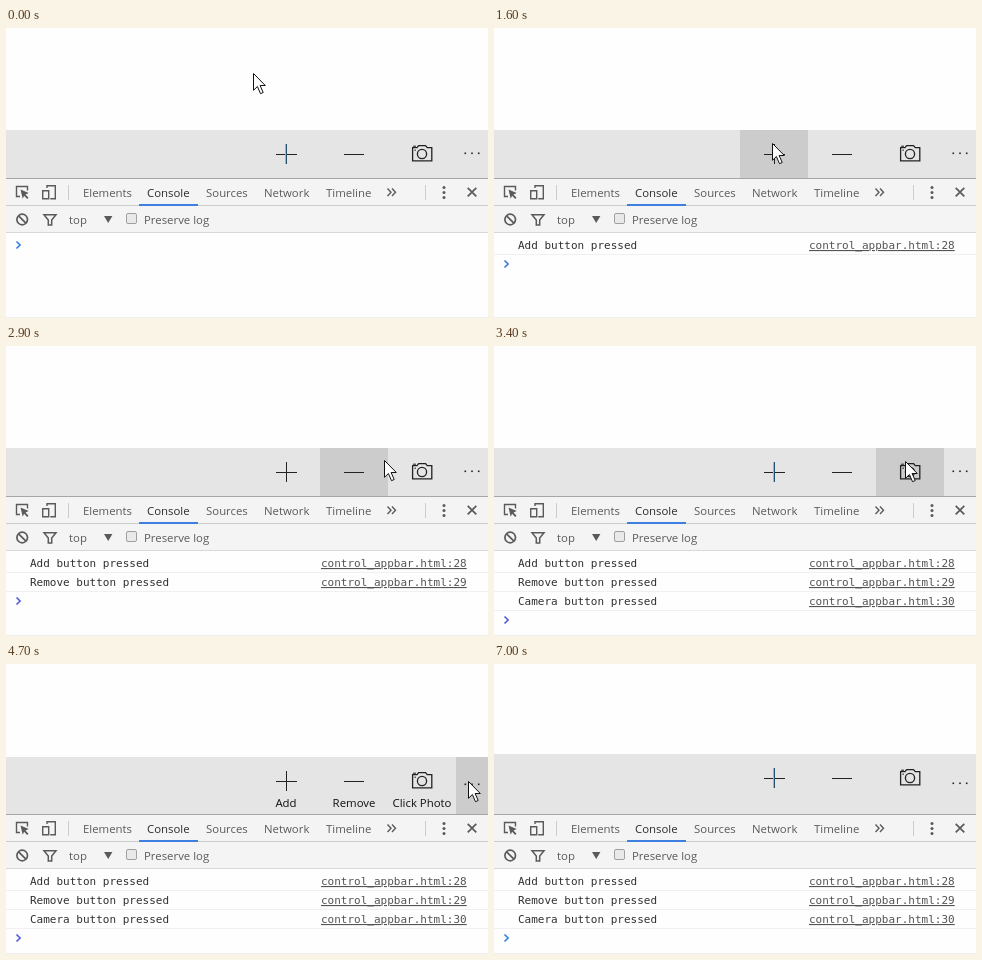
Recreate the animation shown at these times as an HTML page. Size 482 px wide and 290 px high, loop 7100 ms.

```html
<!DOCTYPE html>
<html lang="en">
<head>
<meta charset="utf-8">
<title>App bar and console</title>
<style>
html, body { margin: 0; width: 100%; height: 100%; overflow: hidden; background: #fefefe; }
svg { display: block; width: 482px; height: 290px; }
text { font: 11.4px "Open Sans", "Noto Sans", sans-serif; fill: #5a5a5a; white-space: pre; }
.mono text { font: 11px "DejaVu Sans Mono", "Liberation Mono", monospace; fill: #303030; }
.mono .link { fill: #545454; text-decoration: underline; }
.label { fill: #111; text-anchor: middle; }
.line { fill: none; stroke: #5a5a5a; stroke-width: 1.4; }
.solid { fill: #5a5a5a; }
.crisp { shape-rendering: crispEdges; }

.anim { animation: 7.1s step-end infinite; }
#cursor { animation-name: cursor; }
#hot { animation-name: hot; }
#bar { animation-name: bar; }
#dots { animation-name: dots; }
#labels { animation-name: labels; }
#tint { animation-name: tint; }
#prompt { animation-name: prompt; }
#log1 { animation-name: log1; }
#log2 { animation-name: log2; }
#log3 { animation-name: log3; }

@keyframes cursor {
  0% { transform: translate(247px, 45px); }
  11.26% { transform: translate(250px, 52px); }
  12.67% { transform: translate(258px, 70px); }
  14.08% { transform: translate(268px, 93px); }
  15.49% { transform: translate(276px, 110px); }
  16.9% { transform: translate(278px, 115px); }
  25.35% { transform: translate(290px, 115px); }
  26.76% { transform: translate(324px, 114px); }
  28.16% { transform: translate(343px, 113px); }
  38.02% { transform: translate(347px, 113px); }
  39.43% { transform: translate(361px, 114px); }
  40.84% { transform: translate(378px, 114px); }
  42.25% { transform: translate(400px, 115px); }
  43.66% { transform: translate(411px, 115px); }
  56.33% { transform: translate(428px, 115px); }
  57.74% { transform: translate(454px, 115px); }
  59.15% { transform: translate(460px, 116px); }
  60.56% { transform: translate(462px, 117px); }
  76.05% { transform: translate(472px, 117px); opacity: 1; }
  77.46%, 100% { transform: translate(490px, 117px); opacity: 0; }
}
@keyframes hot {
  0% { transform: translateX(246px); opacity: 0; }
  14.08% { transform: translateX(246px); opacity: .11; }
  19.71% { transform: translateX(246px); opacity: .2; }
  21.12% { transform: translateX(246px); opacity: .11; }
  26.76% { transform: translateX(314px); opacity: .11; }
  32.39% { transform: translateX(314px); opacity: .2; }
  33.8% { transform: translateX(314px); opacity: .11; }
  42.25% { transform: translateX(382px); opacity: .11; }
  46.47% { transform: translateX(382px); opacity: .2; }
  47.88% { transform: translateX(382px); opacity: .11; }
  57.74% { transform: translateX(450px); opacity: .11; }
  63.38% { transform: translateX(450px); opacity: .2; }
  64.78% { transform: translateX(450px); opacity: .11; }
  77.46%, 100% { transform: translateX(450px); opacity: 0; }
}
@keyframes bar {
  0% { transform: translateY(0); }
  64.78% { transform: translateY(-5px); }
  66.19% { transform: translateY(-9px); }
  67.6% { transform: translateY(-11px); }
  69.01%, 100% { transform: translateY(-12px); }
}
@keyframes dots {
  0% { transform: translateY(0); }
  64.78% { transform: translateY(-3px); }
  66.19% { transform: translateY(-5px); }
  67.6%, 100% { transform: translateY(-6px); }
}
@keyframes labels {
  0% { opacity: 0; }
  64.78% { opacity: 1; }
  98.59%, 100% { opacity: 0; }
}
@keyframes tint {
  0% { opacity: 1; }
  1.4% { opacity: 0; }
  46.47% { opacity: 1; }
  63.38% { opacity: 0; }
  84.5%, 100% { opacity: 1; }
}
@keyframes prompt {
  0% { transform: translateY(0); stroke: #2f7fe0; }
  21.12% { transform: translateY(19px); stroke: #3f74e0; }
  33.8% { transform: translateY(38px); stroke: #5058dc; }
  47.88% { transform: translateY(57px); stroke: #5058dc; }
  84.5%, 100% { transform: translateY(57px); stroke: #2f7fe0; }
}
@keyframes log1 { 0% { opacity: 0; } 21.12%, 100% { opacity: 1; } }
@keyframes log2 { 0% { opacity: 0; } 33.8%, 100% { opacity: 1; } }
@keyframes log3 { 0% { opacity: 0; } 47.88%, 100% { opacity: 1; } }
</style>
</head>
<body>
<svg viewBox="0 0 482 290">
  <rect width="482" height="290" fill="#fefefe"/>

  <!-- app bar -->
  <g id="bar" class="anim">
    <rect class="crisp" y="102" width="482" height="60" fill="#e5e5e5"/>
    <rect id="hot" class="anim crisp" y="102" width="68" height="60" opacity="0"/>
    <g class="crisp" fill="#222">
      <rect x="270" y="126" width="21" height="1"/>
      <rect x="280" y="116" width="1" height="20"/>
      <rect x="338" y="126" width="20" height="1"/>
    </g>
    <g id="tint" class="anim crisp">
      <rect x="279" y="116" width="1" height="20" fill="#dca860"/>
      <rect x="280" y="116" width="1" height="20" fill="#24506e"/>
    </g>
    <g fill="none" stroke="#222" stroke-width="1.3">
      <path d="M406.6 119.6h4.4l1.6-2h7l1.6 2h4.6v13.2h-19.2z"/>
      <circle cx="416" cy="126" r="4.6"/>
      <path d="M407 118.2h3M408.4 122.2h1.6" stroke-width="1"/>
    </g>
    <g id="labels" class="anim">
      <text class="label" x="280" y="152">Add</text>
      <text class="label" x="348" y="152">Remove</text>
      <text class="label" x="416" y="152">Click Photo</text>
    </g>
  </g>
  <g id="dots" class="anim" fill="#222">
    <rect x="458.5" y="124.5" width="1.6" height="1.6"/>
    <rect x="465.2" y="124.5" width="1.6" height="1.6"/>
    <rect x="471.9" y="124.5" width="1.6" height="1.6"/>
  </g>

  <!-- developer tools -->
  <g class="crisp">
    <rect y="150" width="482" height="140" fill="#fefefe"/>
    <rect y="150" width="482" height="55" fill="#f4f4f4"/>
    <rect y="150" width="482" height="1" fill="#a6a6a6"/>
    <rect y="177" width="482" height="1" fill="#cdcdcd"/>
    <rect y="204" width="482" height="1" fill="#d8d8d8"/>
    <rect y="289" width="482" height="1" fill="#efefef"/>
    <rect x="133" y="176" width="59" height="2" fill="#3f7fdd"/>
    <rect x="62" y="157" width="1" height="15" fill="#ccc"/>
    <rect x="419" y="157" width="1" height="15" fill="#ccc"/>
  </g>

  <g class="line">
    <path d="M14 168.5h-3.5v-10h11v4"/>
    <path d="M41 160v-2.3h8.3v13h-5M36.7 162.7h6v8h-6z"/>
    <path d="M381.5 160.5l3.5 3.7-3.5 3.7M386 160.5l3.5 3.7-3.5 3.7"/>
    <path d="M461.7 159.8l8.6 8.6M470.3 159.8l-8.6 8.6" stroke-width="1.7"/>
    <circle cx="16.2" cy="191.5" r="5.3" stroke-width="1.7"/>
    <path d="M12.6 187.8l7.3 7.3" stroke-width="1.7"/>
    <path d="M38 186.7h12l-4.3 5.3v5h-3.4v-5z" stroke-width="1.5"/>
  </g>
  <g class="solid">
    <path d="M14.5 161.5l8.2 3.6-3.2 1.3 3 3.3-1.3 1.3-3.1-3.2-1.4 2.9z"/>
    <circle cx="438" cy="159.5" r="1.5"/>
    <circle cx="438" cy="164.5" r="1.5"/>
    <circle cx="438" cy="169.5" r="1.5"/>
    <path d="M98 188h8.4l-4.2 7z"/>
  </g>
  <rect x="120.5" y="185.5" width="10" height="10" rx="1.5" fill="#e9e9e9" stroke="#a0a0a0"/>

  <text x="77" y="169">Elements</text>
  <text x="141" y="169" style="fill:#2c2c2c">Console</text>
  <text x="200" y="169">Sources</text>
  <text x="258" y="169">Network</text>
  <text x="320" y="169">Timeline</text>
  <text x="63" y="196">top</text>
  <text x="138" y="196">Preserve log</text>

  <!-- console output -->
  <g class="mono">
    <g id="log1" class="anim">
      <text x="24" y="221">Add button pressed</text>
      <text class="link" x="315" y="221">control_appbar.html:28</text>
      <rect class="crisp" y="226" width="482" height="1" fill="#f0f0f0"/>
    </g>
    <g id="log2" class="anim">
      <text x="24" y="240">Remove button pressed</text>
      <text class="link" x="315" y="240">control_appbar.html:29</text>
      <rect class="crisp" y="245" width="482" height="1" fill="#f0f0f0"/>
    </g>
    <g id="log3" class="anim">
      <text x="24" y="259">Camera button pressed</text>
      <text class="link" x="315" y="259">control_appbar.html:30</text>
      <rect class="crisp" y="264" width="482" height="1" fill="#f0f0f0"/>
    </g>
  </g>
  <path id="prompt" class="anim" d="M10.5 213.5l3.6 3.5-3.6 3.5" fill="none" stroke="#2f7fe0" stroke-width="1.6"/>

  <path id="cursor" class="anim" d="M.5.5v16.8l3.9-3.8 3.1 7.2 2.7-1.2-3.1-7h5.2z" fill="#fff" stroke="#111"/>
</svg>
</body>
</html>
```
